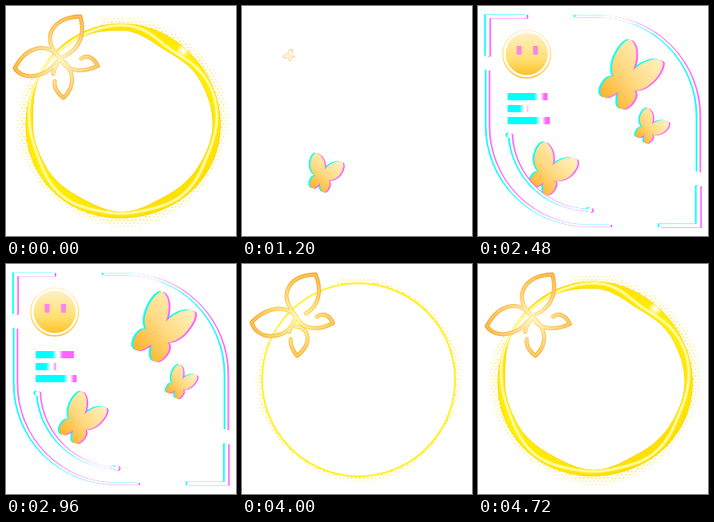
An HTML page with a canvas that plays this animation: 288x288 px, repeating every 4800 ms.

```html
<!DOCTYPE html>
<html lang="en">
<head>
<meta charset="utf-8">
<title>Butterfly ring</title>
<style>
html, body { margin: 0; width: 100%; height: 100%; overflow: hidden; background: #fff; }
canvas { display: block; width: 288px; height: 288px; }
</style>
</head>
<body>
<canvas id="stage" width="288" height="288"></canvas>
<script>
const ctx = document.getElementById('stage').getContext('2d');
const LOOP = 4800, STEP = 80, TAU = Math.PI * 2;
const CYAN = '#00ffff', PINK = '#ff66ff';

const ramp = (t, a, b) => Math.min(1, Math.max(0, (t - a) / (b - a)));
const smooth = u => u * u * (3 - 2 * u);
const mix = (a, b, u) => a + (b - a) * u;

// Keys are [time, ...values]; the first segment slows down towards its end.
function track(t, keys) {
  if (t <= keys[0][0]) return keys[0].slice(1);
  for (let i = 1; i < keys.length; i++) {
    const a = keys[i - 1], b = keys[i];
    if (t <= b[0]) {
      const u = ramp(t, a[0], b[0]);
      return a.slice(1).map((v, n) => mix(v, b[n + 1], u));
    }
  }
  return keys[keys.length - 1].slice(1);
}

// Paints a shape with a cyan ghost on the left and a pink one on the right.
function fringe(paint, color, dx = 2, dy = 0.4) {
  for (const [c, side] of [[CYAN, -1], [PINK, 1], [color, 0]]) {
    ctx.save();
    ctx.translate(side * dx, side * dy);
    ctx.fillStyle = ctx.strokeStyle = c;
    paint();
    ctx.restore();
  }
}

function circle(x, y, r) {
  ctx.beginPath();
  ctx.arc(x, y, Math.max(0, r), 0, TAU);
}

// ---- golden ring ----
const RING = { x: 146, y: 145, r: 122 };
const THICKNESS = [10, 13, 14, 8, 14, 12, 9, 2.5, 5, 9, 17, 11];

function thickness(angle) {
  const p = ((angle / TAU * 12) % 12 + 12) % 12, i = Math.floor(p);
  return mix(THICKNESS[i], THICKNESS[(i + 1) % 12], smooth(p - i));
}

function ringLine(radius, reverse) {
  for (let i = 0; i <= 180; i++) {
    const a = (reverse ? 180 - i : i) / 180 * TAU, r = radius(a);
    const x = RING.x + r * Math.cos(a), y = RING.y + r * Math.sin(a);
    i ? ctx.lineTo(x, y) : ctx.moveTo(x, y);
  }
}

function drawDots(grow) {
  ctx.fillStyle = '#ffdc1e';
  for (let row = 0; row < 72; row++) {
    for (let col = 0; col < 58; col++) {
      const x = col * 5 + (row % 2) * 2.5, y = row * 4;
      const dx = x - RING.x, dy = y - RING.y, a = Math.atan2(dy, dx);
      const out = Math.hypot(dx, dy) - RING.r;
      const reach = mix(7, 11, grow) + 4 * Math.sin(2 * a - 2.8) * Math.sin(a * 2 + .3);
      if (out < 0 || out > reach || (x < 118 && y < 92)) continue;
      const size = mix(1.7, 0.9, out / reach);
      ctx.fillRect(x - size / 2, y - size / 2, size, size);
    }
  }
}

function drawRing(t) {
  const alpha = ramp(t, 3860, 3980) * (1 - ramp(t, 5820, 5920));
  if (!alpha) return;
  const grow = smooth(ramp(t, 3960, 4500)) * (1 - smooth(ramp(t, 5440, 5840)));
  const width = a => mix(1.8 + thickness(a) * 0.04, thickness(a), grow);
  const outer = a => RING.r + grow * 1.4 * Math.sin(3 * a + 0.5);
  const inner = a => outer(a) - width(a);

  ctx.save();
  ctx.globalAlpha = alpha;
  drawDots(grow);
  const gold = ctx.createLinearGradient(60, 20, 230, 270);
  gold.addColorStop(0, '#ffdf00');
  gold.addColorStop(0.5, '#fff000');
  gold.addColorStop(1, '#ffdc00');
  ctx.beginPath();
  ringLine(outer);
  ringLine(inner, true);
  ctx.fillStyle = grow > 0.1 ? gold : '#fff12d';
  ctx.fill('evenodd');

  if (grow > 0) {
    ctx.clip('evenodd');
    ctx.globalAlpha = alpha * grow;
    ctx.strokeStyle = '#ffc900';
    ctx.lineWidth = 1.2;
    for (const edge of [outer, inner]) {
      ctx.beginPath();
      ringLine(edge);
      ctx.stroke();
    }
    const streak = a => outer(a) - width(a) * (0.5 + 0.24 * Math.sin(5 * a));
    for (const [color, line] of [['#fff56e', 4], ['#fffcc0', 1.5]]) {
      ctx.beginPath();
      ringLine(streak);
      ctx.strokeStyle = color;
      ctx.lineWidth = line;
      ctx.stroke();
    }
    ctx.translate(222, 56);
    ctx.rotate(0.8);
    const shine = ctx.createRadialGradient(0, 0, 1, 0, 0, 9);
    shine.addColorStop(0, '#fff');
    shine.addColorStop(1, 'rgba(255,255,255,0)');
    ctx.fillStyle = shine;
    ctx.fillRect(-9, -9, 18, 18);
  }
  ctx.restore();
}

// ---- outlined butterfly ----
function drawEmblem(t) {
  const size = smooth(ramp(t, 3760, 3990)) * mix(1, 0.14, smooth(ramp(t, 5780, 5990)))
    * (1 - ramp(t, 6000, 6120));
  if (!size) return;
  const open = 0.5 + 0.5 * Math.cos(TAU * (t - 4000) / 1520);
  const m = (closed, opened) => mix(closed, opened, open);
  const home = ramp(size, 0.14, 1);

  ctx.save();
  ctx.translate(mix(59, 65, home), mix(62, 65, home));
  ctx.scale(size, size);
  ctx.translate(-65, -65);
  const wings = new Path2D();
  wings.moveTo(67, 64);
  wings.bezierCurveTo(m(44, 46), m(44, 42), 55, 14, m(93, 92), 13);
  wings.bezierCurveTo(m(99, 101), 33, m(94, 96), 53, m(73, 80), m(63, 62));
  wings.moveTo(66, 64);
  wings.bezierCurveTo(m(51, 50), m(44, 49), m(25, 27), m(51, 57), m(11, 12), m(78, 73));
  wings.bezierCurveTo(m(22, 19), m(94, 96), m(49, 50), m(90, 94), m(64, 61), m(70, 79));
  wings.moveTo(68, 66);
  wings.bezierCurveTo(76, 84, 98, 83, m(115, 114), m(75, 74));
  wings.bezierCurveTo(110, 65, 102, 60, 94, 66);
  wings.moveTo(m(68, 66), m(66, 78));
  wings.bezierCurveTo(86, 80, 88, 100, m(72, 69), 115);
  wings.bezierCurveTo(64, 109, 60, 102, 61, 94);
  wings.moveTo(67, 67);
  wings.lineTo(61, m(78, 80));
  wings.lineTo(59, 85);

  const paint = (width, near, far) => {
    const g = ctx.createRadialGradient(69, 68, 2, 69, 68, 60);
    g.addColorStop(0, near);
    g.addColorStop(1, far);
    ctx.strokeStyle = g;
    ctx.lineWidth = width;
    ctx.stroke(wings);
  };
  ctx.lineJoin = 'round';
  ctx.lineCap = 'round';
  paint(5, open > 0.5 ? '#ffe637' : '#ffdf80', '#f49a19');
  paint(3, '#fff6c4', '#ffbd48');
  ctx.restore();
}

// ---- filled butterflies: [time, x, y, length, tilt, wing spread] ----
const FLIGHTS = [
  [[1040, 92, 234, 0, 10, .4], [1200, 102, 210, 43, 20, .42], [1400, 140, 150, 60, 32, .37],
   [1600, 164, 112, 73, 39, .39], [1840, 177, 95, 77, 42, .41], [2480, 189, 88, 78, 34, .33],
   [3440, 201, 73, 80, 30, .38], [3860, 224, 44, 0, 25, .4]],
  [[1360, 184, 196, 0, 20, .4], [1600, 206, 166, 30, 32, .4], [1840, 213, 155, 38, 37, .36],
   [2480, 215, 152, 38, 35, .43], [3440, 221, 145, 38, 30, .36], [3820, 230, 130, 0, 28, .4]],
  [[1320, 62, 254, 0, 14, .4], [1600, 78, 231, 48, 22, .38], [1840, 86, 219, 59, 26, .35],
   [2480, 90, 206, 57, 29, .42], [3440, 98, 182, 60, 40, .33], [3820, 110, 160, 0, 42, .4]]
];

function wingShape(h) {
  const shape = new Path2D();
  for (const s of [-1, 1]) {
    const curve = (...p) => shape.bezierCurveTo(s * p[0], p[1], s * p[2], p[3], s * p[4], p[5]);
    shape.moveTo(0, -0.12);
    curve(0.02, -0.24, 0.4 * h, -0.5, 0.94 * h, -0.5);
    curve(1.28 * h, -0.44, 1.25 * h, 0.02, 0.2, 0.14);
    curve(0.32, 0.17, 0.3, 0.46, 0.2, 0.5);
    curve(0.11, 0.54, 0.06, 0.43, 0, 0.3);
    shape.closePath();
  }
  return shape;
}

function drawButterfly(t, keys) {
  const [x, y, size, tilt, spread] = track(t, keys);
  if (size < 0.5) return;
  const shape = wingShape(spread + 0.035 * Math.sin(TAU * (t - 1840) / 640));
  const gold = ctx.createLinearGradient(0.2, -0.5, -0.1, 0.5);
  gold.addColorStop(0, '#fff0bb');
  gold.addColorStop(0.5, '#ffda83');
  gold.addColorStop(1, '#ffb52f');
  const place = paint => () => {
    ctx.translate(x, y);
    ctx.rotate(tilt * Math.PI / 180);
    ctx.scale(size, size);
    paint();
  };
  const shift = 1.3 + size / 75;
  fringe(place(() => {
    ctx.lineWidth = 1.3 / size;
    ctx.beginPath();
    for (const s of [-1, 1]) {
      ctx.moveTo(0, -0.12);
      ctx.quadraticCurveTo(s * 0.02, -0.22, s * 0.08, -0.27);
    }
    ctx.stroke();
  }), '#fff', 1, 0.5);
  fringe(place(() => ctx.fill(shape)), gold, shift, 0.6);
}

// ---- frame lines ----
function bothCorners(paint) {
  paint();
  ctx.translate(288, 288);
  ctx.rotate(Math.PI);
  paint();
}

function drawFrame(t) {
  const enter = 1 - Math.pow(1 - ramp(t, 1280, 2240), 2.7);
  const leave = Math.pow(ramp(t, 2880, 3900), 2.6);
  const shown = enter * (1 - leave);
  const corner = smooth(ramp(t, 1240, 1600)) * (1 - smooth(ramp(t, 3600, 3880)));
  const bold = mix(4.6, 1.6, smooth(ramp(t, 2880, 3360)));

  if (corner > 0) fringe(() => bothCorners(() => {
    ctx.lineWidth = bold;
    ctx.beginPath();
    ctx.moveTo(12, 13 + 50 * corner);
    ctx.lineTo(12, 13);
    ctx.lineTo(12 + 49 * corner, 13);
    ctx.stroke();
  }), '#fff');

  if (shown > 0) fringe(() => bothCorners(() => {
    ctx.lineWidth = 2.8;
    ctx.setLineDash([295 * shown, 999]);
    ctx.beginPath();
    ctx.moveTo(166, 275);
    ctx.lineTo(137, 275);
    ctx.arc(137, 150, 125, Math.PI / 2, Math.PI);
    ctx.lineTo(12, 80);
    ctx.stroke();
  }), '#fff');

  const sweep = (1 - Math.pow(1 - ramp(t, 1400, 2240), 2.3)) * (1 - Math.pow(ramp(t, 2880, 3680), 2));
  if (sweep <= 0) return;
  const start = 3.08, end = start - 1.51 * sweep;
  fringe(() => {
    ctx.lineWidth = 2.8;
    ctx.beginPath();
    ctx.arc(140, 156, 99.5, end, start);
    ctx.stroke();
    circle(39.5, 162, 3);
    ctx.fill();
    circle(140 + 99.5 * Math.cos(end), 156 + 99.5 * Math.sin(end), 3 * ramp(sweep, 0.75, 1));
    ctx.fill();
  }, '#fff');
}

// ---- bars: [time, cyan end, total end] ----
const BARS = [
  [109, [[1400, 37, 37], [1840, 92, 97], [2480, 75, 87], [3440, 51, 83], [3840, 37, 37]]],
  [124, [[1440, 37, 37], [1840, 62, 62], [2480, 57, 63], [3440, 53, 62], [3840, 37, 37]]],
  [139, [[1480, 37, 37], [1840, 77, 77], [2480, 77, 90], [3440, 77, 87], [3840, 37, 37]]]
];

function drawBars(t) {
  for (const [y, keys] of BARS) {
    const [split, end] = track(t, keys);
    if (end <= 37.5) continue;
    ctx.fillStyle = CYAN;
    ctx.fillRect(37, y, split - 37, 9);
    const pinkFrom = Math.min(end, split + 4);
    ctx.fillStyle = PINK;
    ctx.fillRect(pinkFrom, y, end - pinkFrom, 9);
    if (end - split < 2) continue;
    const shine = ctx.createLinearGradient(split - 5, 0, split + 8, 0);
    shine.addColorStop(0, 'rgba(255,255,255,0)');
    shine.addColorStop(0.45, '#fff');
    shine.addColorStop(0.65, '#fff');
    shine.addColorStop(1, 'rgba(255,255,255,0)');
    ctx.fillStyle = shine;
    ctx.fillRect(split - 5, y, 13, 9);
  }
}

// ---- face ----
function drawFace(t) {
  const grow = 1 - Math.pow(1 - ramp(t, 1640, 2160), 2);
  const r = 30 * grow * (1 - smooth(ramp(t, 3560, 3840)));
  if (r < 0.5) return;
  const gold = ctx.createLinearGradient(0, 60 - r, 0, 60 + r);
  gold.addColorStop(0, '#fff2cf');
  gold.addColorStop(0.6, '#ffe071');
  gold.addColorStop(1, '#ffbd20');
  circle(61, 60, r);
  ctx.fillStyle = '#fff';
  ctx.fill();
  ctx.strokeStyle = gold;
  ctx.lineWidth = 1.5;
  ctx.stroke();
  const fill = smooth(ramp(t, 1860, 2200));
  circle(61, 60, r * 0.88 * fill);
  ctx.fillStyle = gold;
  ctx.fill();
  const eye = fill * r / 30;
  ctx.fillStyle = '#ff83e9';
  for (const x of [51.5, 72]) {
    ctx.fillRect(61 + (x - 61) * eye - 3 * eye, 60 - 10 * eye, 6 * eye, 11 * eye);
  }
}

function draw(t) {
  ctx.fillStyle = '#fff';
  ctx.fillRect(0, 0, 288, 288);
  const late = t < 2400 ? t + LOOP : t;
  drawRing(late);
  drawEmblem(late);
  drawBars(t);
  drawFace(t);
  FLIGHTS.forEach(keys => drawButterfly(t, keys));
  drawFrame(t);
}

const origin = performance.now();
function tick() {
  const t = Math.max(0, performance.now() - origin) % LOOP;
  draw(Math.floor(t / STEP) * STEP);
  requestAnimationFrame(tick);
}
tick();
</script>
</body>
</html>
```
